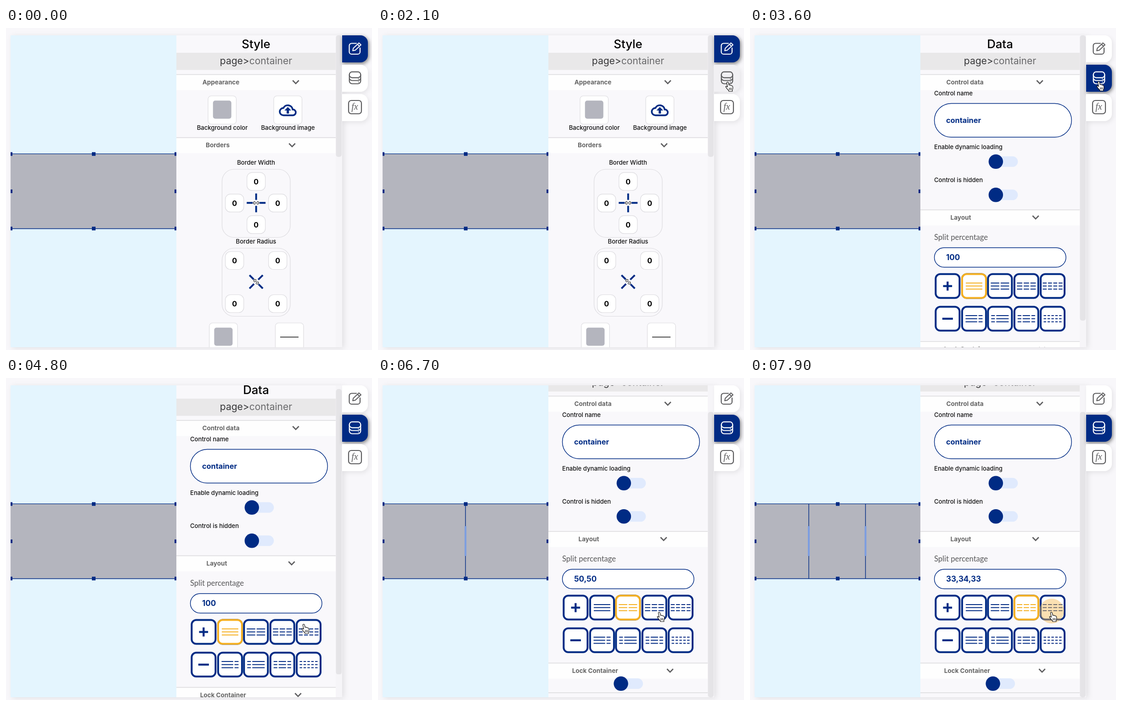
Recreate the animation shown at these times as an HTML page. Size 797 by 702 pixels, loop 8 s.

```html
<!DOCTYPE html>
<html lang="en">
<head>
<meta charset="utf-8">
<title>Container layout editor</title>
<style>
  html, body { margin: 0; width: 100%; height: 100%; overflow: hidden; background: #f8f7fa; }
  svg { display: block; }
  text { font-family: Inter, "Open Sans", sans-serif; }
  .navy { fill: #002b84; }
  .line { stroke: #002b84; fill: none; }
  .card { fill: #fff; stroke: #dddce0; stroke-width: 1.2; }
  .label { font-size: 13.1px; font-weight: 500; fill: #111; }
  .head { font-size: 13.5px; font-weight: 650; fill: #646464; }
  .value { font-size: 17px; font-weight: 700; fill: #002b84; }
  .num { font-size: 16px; font-weight: 700; fill: #000; }
  .mid { text-anchor: middle; }
  .stroke { fill: none; stroke: currentColor; stroke-linecap: round; stroke-linejoin: round; }
  .soft { filter: drop-shadow(3px 4px 5px rgba(0,0,0,.07)); }
  .sheet { filter: drop-shadow(4px 2px 6px rgba(0,0,0,.09)); }

  .anim { animation: 8s linear infinite; }
  .step { animation: 8s step-end infinite; }
  .styling { animation-name: first; }
  .data { animation-name: second; }
  .one { animation-name: one; }
  .two { animation-name: two; }
  .three { animation-name: three; }
  .scroll { animation-name: scroll; }
  .thumb { animation-name: thumb; }
  .tab-style { animation-name: tabStyle; }
  .tab-data { animation-name: tabData; }
  .cursor { animation: move 8s ease-in-out infinite; }
  .ripple { animation-name: ripple; transform-box: fill-box; transform-origin: center; }

  @keyframes first { 0% { opacity: 1 } 35%, 100% { opacity: 0 } }
  @keyframes second { 0% { opacity: 0 } 35%, 100% { opacity: 1 } }
  @keyframes one { 0% { opacity: 1 } 77.5%, 100% { opacity: 0 } }
  @keyframes two { 0% { opacity: 0 } 77.5% { opacity: 1 } 87.5%, 100% { opacity: 0 } }
  @keyframes three { 0% { opacity: 0 } 87.5%, 100% { opacity: 1 } }
  @keyframes scroll {
    0%, 58.4% { transform: translateY(0) }
    60% { transform: translateY(-8.7px) }
    61.25% { transform: translateY(-38px) }
    62.5%, 100% { transform: translateY(-62px) }
  }
  @keyframes thumb {
    0%, 58.4% { transform: translateY(0) }
    60% { transform: translateY(8.2px) }
    61.25% { transform: translateY(35px) }
    62.5%, 100% { transform: translateY(58px) }
  }
  @keyframes tabStyle {
    0%, 35% { fill: #002b84; color: #fff; filter: drop-shadow(2px 3px 4px rgba(0,0,0,.5)) }
    38%, 100% { fill: #fff; color: #5b5b5d; filter: drop-shadow(3px 4px 5px rgba(0,0,0,.07)) }
  }
  @keyframes tabData {
    0%, 24% { fill: #fff; color: #5b5b5d; filter: drop-shadow(3px 4px 5px rgba(0,0,0,.07)) }
    26%, 35% { fill: #f1f0f3; color: #5b5b5d; filter: drop-shadow(3px 4px 5px rgba(0,0,0,.07)) }
    38%, 100% { fill: #002b84; color: #fff; filter: drop-shadow(2px 3px 4px rgba(0,0,0,.5)) }
  }
  @keyframes move {
    0%, 21.25% { transform: translate(815px, 190px) }
    25.6%, 26.5% { transform: translate(761px, 118px) }
    31%, 45% { transform: translate(759px, 117px) }
    52.5%, 55% { transform: translate(650px, 575px) }
    58.5%, 67.5% { transform: translate(648px, 537px) }
    73.2%, 78.75% { transform: translate(547px, 496px) }
    83.5%, 90.3% { transform: translate(612px, 511px) }
    95%, 100% { transform: translate(656px, 511px) }
  }
  @keyframes ripple {
    0%, 32.5% { opacity: 0; transform: scale(.6) }
    33.5%, 35.5% { opacity: 1; transform: scale(1) }
    37.5% { opacity: 0; transform: scale(1) }
    38%, 75% { opacity: 0; transform: scale(.6) }
    76%, 77% { opacity: 1; transform: scale(1) }
    78.75% { opacity: 0; transform: scale(1) }
    79%, 85% { opacity: 0; transform: scale(.6) }
    86%, 87.5% { opacity: 1; transform: scale(1) }
    89.5% { opacity: 0; transform: scale(1) }
    90%, 97.2% { opacity: 0; transform: scale(.6) }
    98.5%, 100% { opacity: 1; transform: scale(1) }
  }
</style>
</head>
<body>
<svg id="stage" width="797" height="702" viewBox="0 0 797 702" xmlns="http://www.w3.org/2000/svg"></svg>
<script>
const rect = (x, y, w, h, r, attrs) =>
  `<rect x="${x}" y="${y}" width="${w}" height="${h}" rx="${r}" ${attrs}/>`;
const path = (d, attrs) => `<path d="${d}" ${attrs}/>`;
const text = (x, y, cls, str, attrs = '') => `<text x="${x}" y="${y}" class="${cls}" ${attrs}>${str}</text>`;
const group = (cls, body, attrs = '') => `<g class="${cls}" ${attrs}>${body}</g>`;

// Page with the selected container
const handle = (x, y) => rect(x - 4, y - 4, 8, 8, 0, 'class="navy"');
const divider = x =>
  rect(x - .7, 274, 1.4, 163, 0, 'class="navy"') + rect(x - 2, 323, 4, 65, 0, 'fill="#7c9de0"');

const page = () =>
  rect(10, 16, 361, 680, 0, 'fill="#e4f5fe"') +
  `<g clip-path="url(#pageClip)">` +
  rect(10, 274, 361, 163.5, 0, 'fill="#b4b5be"') +
  path('M10 274.3H371M10 437.5H371', 'class="line" stroke-width="1.3"') +
  group('step two', divider(190.5)) +
  group('step three', divider(128) + divider(251.5)) +
  [274.7, 356, 437.2].map(y => handle(10, y) + handle(371, y)).join('') +
  handle(191, 274.7) + handle(191, 437.2) + '</g>';

// Shared panel parts
const section = (y, name, x, chevronX) =>
  rect(371, y, 347, 33.5, 0, 'fill="#fefefe"') +
  path(`M371 ${y - .5}H718`, 'stroke="#dad9dc" stroke-width="1.4"') +
  text(x, y + 20.5, 'head mid', name) +
  path(`M${chevronX - 6.7} ${y + 12.3}l6.7 6.8l6.7-6.8`, 'fill="none" stroke="#5e5e60" stroke-width="2.7"');

const header = title =>
  text(544.5, 44.3, 'mid', title, 'font-size="25.7" font-weight="450" fill="#000"') +
  rect(371, 54, 347, 37.5, 0, 'fill="#e9e8e9"') +
  text(544.5, 79, 'mid', 'page&gt;<tspan fill="#68686a">container</tspan>', 'font-size="21" fill="#38383a"');

const card = (x, y) => rect(x, y, 61.5, 61.5, 7, 'class="card"');
const swatch = (x, y) => card(x, y) + rect(x + 10.7, y + 10.3, 40, 39.5, 5, 'fill="#b4b5be"');
const numBox = (x, y) =>
  rect(x - 20, y - 19.5, 40, 39, 11, 'class="card"') + text(x, y + 5.8, 'num mid', '0');

// Four-way input with a link symbol; turned 45 degrees for the corners
const quad = (y, spots, turn) =>
  rect(470.5, y, 148.5, 148.5, 26, 'fill="none" stroke="#dddce0" stroke-width="1.2"') +
  spots.map(([x, dy]) => numBox(x, y + dy)).join('') +
  `<g transform="translate(544.7 ${y + 73.3}) rotate(${turn})">` +
  path('M0-20.5V-6.5M0 6.5V20.5M-20.5 0H-7.5M7.5 0H20.5', 'class="line" stroke-width="3.9"') +
  path('M-1.5-2.6h-2a2.6 2.6 0 0 0 0 5.2h2M1.5-2.6h2a2.6 2.6 0 0 1 0 5.2h-2M-2.8 0h5.6',
    'fill="none" stroke="#222" stroke-width="1.3"') + '</g>';

const cloud =
  `<g transform="translate(594.5 160) scale(1.6)">` +
  path('M18.6 11A6.7 6.7 0 0 0 6 9A5 5 0 0 0 6 19H19A4 4 0 0 0 18.6 11Z', 'class="line" stroke-width="2.3"') +
  path('M12 7.6l4.6 4.8h-3v4.2h-3.2v-4.2H7.4z', 'class="navy"') + '</g>';

const stylePanel = () =>
  header('Style') +
  section(102, 'Appearance', 468, 631) +
  swatch(440, 148) + card(583, 148) + cloud +
  text(471, 222.3, 'label mid', 'Background color') +
  text(614, 222.3, 'label mid', 'Background image') +
  section(239.5, 'Borders', 461, 623) +
  text(544.5, 297.5, 'label mid', 'Border Width') +
  quad(308, [[544.7, 26.7], [497.7, 73.7], [591.7, 73.7], [544.7, 120.7]], 0) +
  text(544.5, 469.7, 'label mid', 'Border Radius') +
  quad(480, [[497.7, 27], [591.7, 27], [497.7, 121], [591.7, 121]], 45) +
  swatch(442.7, 643) + card(586.5, 643) +
  path('M597 673.7H637', 'stroke="#111" stroke-width="1.6"');

const toggle = (x, y) =>
  rect(x - 14, y - 11.5, 62, 23, 11.5, 'fill="#e0eafd"') + `<circle cx="${x}" cy="${y}" r="15.7" class="navy"/>`;

// Three rows of bars, split by column ratios
const bars = (ratios, width) => {
  const gap = 3, total = ratios.reduce((a, b) => a + b);
  const unit = (width - gap * (ratios.length - 1)) / total;
  let d = '', x = -width / 2;
  for (const r of ratios) {
    for (const y of [-6.7, 0, 6.7]) d += `M${x.toFixed(1)} ${y}h${(r * unit).toFixed(1)}`;
    x += r * unit + gap;
  }
  return d;
};
const columns = [430.3, 487.9, 544.3, 601.8, 659];
const button = (col, y, d, weight, color = '#002b84') =>
  `<g transform="translate(${columns[col]} ${y})" stroke="${color}">` +
  rect(-26, -26, 52, 52, 10, 'fill="#fff" stroke-width="4"') +
  path(d, `stroke-width="${weight}"`) + '</g>';

const rowOne = [bars([1], 36), bars([1, 1], 40), bars([1, 1, 1], 41), bars([1, 1, 1, 1], 43)];
const rowTwo = [bars([2.9, 1], 37), bars([1, 3.4], 38), bars([1, 2, 1], 38), bars([1, 1, 1, 1, 1], 39)];
const modes = [['one', '100'], ['two', '50,50'], ['three', '33,34,33']];

const dataPanel = () =>
  header('Data') +
  section(102, 'Control data', 468, 631) +
  text(401, 147.3, 'label', 'Control name') +
  rect(401.5, 164.5, 298.7, 73.5, 36.7, 'fill="#fff" stroke="#002b84" stroke-width="1.4"') +
  text(427, 207.2, 'value', 'container', 'style="font-size:16.3px"') +
  text(401, 263.5, 'label', 'Enable dynamic loading') + toggle(535.3, 291.3) +
  text(401, 335.9, 'label', 'Control is hidden') + toggle(535.3, 363.8) +
  section(397, 'Layout', 459, 622) +
  text(401, 462.2, '', 'Split percentage', 'style="font:16.6px Lato,sans-serif" fill="#58585a"') +
  rect(401.5, 479, 286.5, 42.5, 21.2, 'fill="#fff" stroke="#002b84" stroke-width="1.4"') +
  button(0, 562.6, 'M-9.8 0H9.8M0-9.8V9.8', 4.3) +
  button(0, 633.8, 'M-11.5 0H11.5', 4.3) +
  rowOne.map((d, i) => button(i + 1, 562.6, d, 2)).join('') +
  rowTwo.map((d, i) => button(i + 1, 633.8, d, 2)).join('') +
  modes.map(([cls, value], i) => group('step ' + cls,
    text(427, 506.2, 'value', value) + button(i + 1, 562.6, rowOne[i], 2, '#f5b021'))).join('') +
  section(684, 'Lock Container', 472.7, 636) +
  toggle(529, 728.3) +
  path('M371 748.3H718', 'stroke="#dad9dc" stroke-width="1.4"');

const scrollbar = (height, cls) => rect(718.5, 16, 12.5, height, 5, `fill="#e5e4e7" class="${cls}"`);

const panel = () =>
  rect(10, 16, 722, 680, 0, 'fill="#f9f8fb" class="sheet"') +
  page() +
  `<g clip-path="url(#panelClip)">` +
  rect(718, 16, 14, 680, 0, 'fill="#f6f5f8"') +
  group('step styling', stylePanel() + scrollbar(265, '')) +
  group('step data', group('anim scroll', dataPanel()) + scrollbar(622, 'anim thumb')) + '</g>';

// Side tabs
const tab = (y, cls, icon) =>
  `<g class="${cls}" fill="#fff" color="#5b5b5d">` +
  path(`M732 ${y}H772a16 16 0 0 1 16 16V${y + 43}a16 16 0 0 1-16 16H732Z`, '') +
  `<g class="stroke" stroke-width="2.2" transform="translate(760 ${y + 28.5})">${icon}</g></g>`;

const pencil = path('M3-11H-7.5a5 5 0 0 0-5 5V7.5a5 5 0 0 0 5 5H6a5 5 0 0 0 5-5V-1', '') +
  path('M-5 5l1.2-5.2L8.5-12l4.5 4.2L.5 4Z M5.5-9l4.3 4.2', 'stroke-width="1.9"');
const stack = rect(-12.3, -12.8, 24.6, 12.6, 6, '') +
  path('M-12.3-6.5V7a6 6 0 0 0 6 6H6.3a6 6 0 0 0 6-6V-6.5M-12.3 0a6 6 0 0 0 6 6H6.3a6 6 0 0 0 6-6', '') +
  path('M7.5 2.4h.1M7.5 9.2h.1', 'stroke-width="2"');
const formula = rect(-14, -14.5, 28, 29, 6, '') +
  text(-.5, 5.5, 'mid', 'fx', 'style="font:italic 20px \'Liberation Serif\',serif" fill="currentColor" stroke="none"');

// Pointer with its fingertip at 0,0
const hand = `<g transform="translate(-4.5 -1)" stroke="#111" stroke-width="1.2" stroke-linejoin="round">` +
  path('M4.5.8C5.9.6 6.6 1.6 6.8 2.7L7.6 7.4C8.3 6.8 10 6.9 10.3 8C11 7.4 12.8 7.6 13 8.9C14 8.5 15.6 9 15.9 10.5' +
    'C16.4 13 16.7 15.5 15 18L15.2 21H7.5L7 19C5 17.5 2.5 14 .9 11.6C.3 10.4 1.9 9.3 3.1 10.3L4.8 11.6L3 3C2.7 1.8 3.3 1 4.5.8Z',
    'fill="#fff"') +
  path('M8.3 13.5v4.6M10.6 13.4v4.7M12.9 13.3v4.8', 'fill="none" stroke-width="1"') + '</g>';

document.getElementById('stage').innerHTML =
  `<defs><clipPath id="pageClip"><rect x="10" y="16" width="361" height="680"/></clipPath>
   <clipPath id="panelClip"><rect x="371" y="16" width="361" height="680"/></clipPath></defs>` +
  rect(0, 0, 797, 702, 0, 'fill="#f8f7fa"') +
  panel() +
  tab(16, 'anim tab-style', pencil) +
  tab(80, 'anim tab-data', stack) +
  tab(144, 'soft', formula) +
  group('cursor', '<circle cx="1" cy="-3" r="27" class="anim ripple" fill="rgba(245,187,85,.45)"/>' + hand);
</script>
</body>
</html>
```
